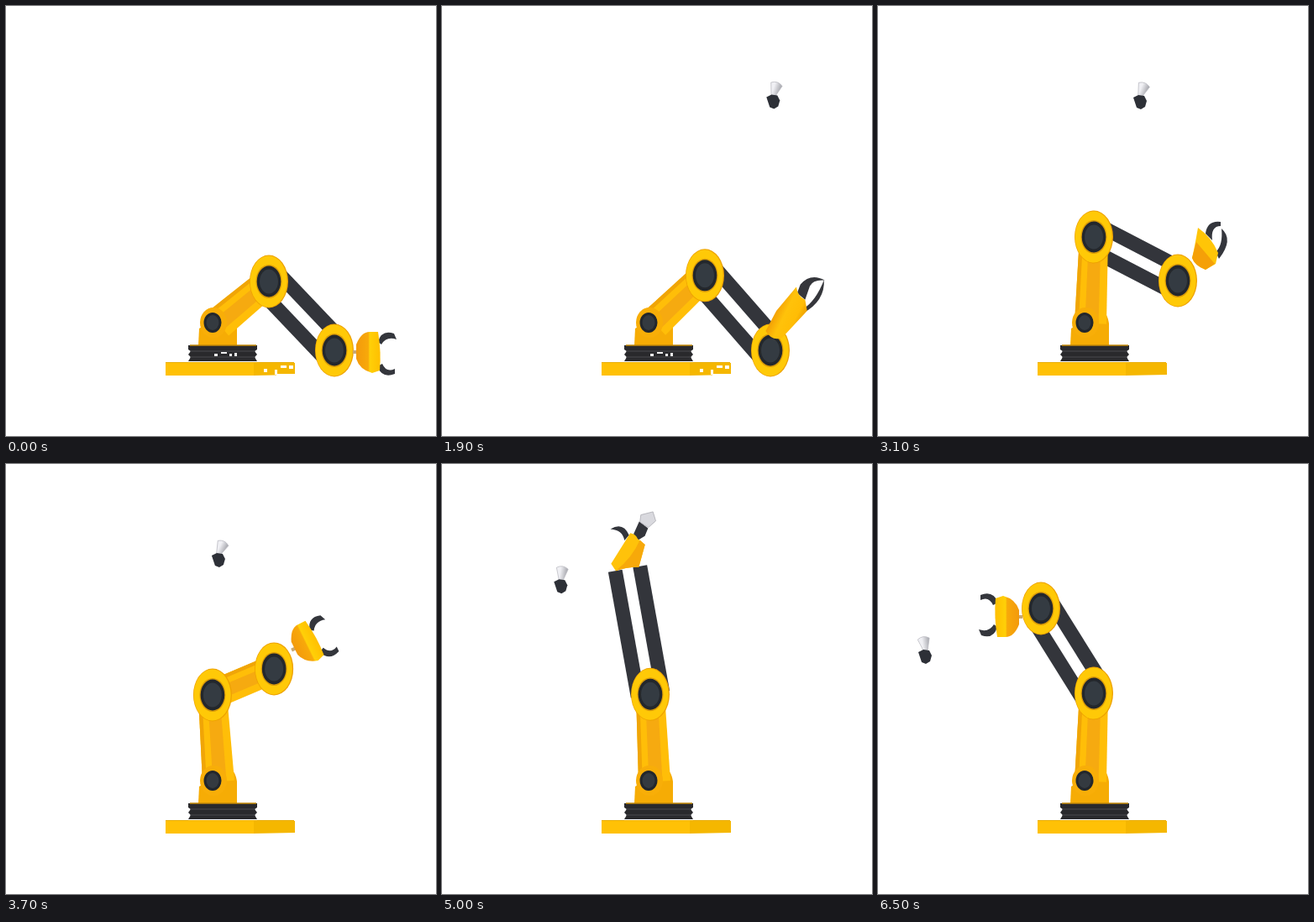
Write an HTML page that moves like this. It is 512x512 px and loops after 6600 ms.

```html
<!DOCTYPE html>
<html lang="en">
<head>
<meta charset="utf-8">
<title>Robot arm</title>
<style>
  html, body { margin: 0; width: 100%; height: 100%; overflow: hidden; background: #fff; }
  svg { display: block; width: 100%; height: 100%; }
</style>
</head>
<body>
<svg viewBox="0 0 512 512">
  <defs>
    <linearGradient id="gold">
      <stop offset="0" stop-color="#f3a005"/>
      <stop offset=".35" stop-color="#ffc20a"/>
      <stop offset=".75" stop-color="#ffbd05"/>
      <stop offset="1" stop-color="#eda000"/>
    </linearGradient>
    <linearGradient id="cup">
      <stop offset="0" stop-color="#f39a0c"/>
      <stop offset=".5" stop-color="#f8a90a"/>
      <stop offset=".56" stop-color="#ffd008"/>
      <stop offset="1" stop-color="#ffbf00"/>
    </linearGradient>
    <linearGradient id="wing">
      <stop offset=".35" stop-color="#f0f0f4"/>
      <stop offset="1" stop-color="#a3a4aa"/>
    </linearGradient>
    <g id="joint">
      <ellipse rx="23" ry="31.5" fill="#eda100"/>
      <ellipse cx="-.3" rx="22" ry="30.5" fill="#ffc907"/>
      <ellipse rx="15.5" ry="20" fill="#d99a08"/>
      <ellipse rx="14.3" ry="18.5" fill="#23272c"/>
      <ellipse rx="11" ry="14.5" fill="#343b42"/>
    </g>
    <g id="fly">
      <path id="wings" d="M-2 1L-7-13Q0-18 7-13L3 1Z" fill="url(#wing)" stroke="#b9b9c0" stroke-width=".7"/>
      <path d="M-8 3L-2 0L5 1L8 7L6 14L1 17L-4 15L-6 9Z" fill="#2d3037"/>
    </g>
  </defs>

  <g id="forearm">
    <line class="rod" stroke="#33353b" stroke-width="17"/>
    <line class="rod" stroke="#33353b" stroke-width="17"/>
  </g>
  <g id="solid"></g>

  <path d="M190 424H295V440H190Z" fill="#ffc106"/>
  <path d="M295 425H344V439L295 440Z" fill="#f5b700"/>
  <path d="M190 424.5H343" stroke="#e9ae08"/>
  <path id="worn" d="M307 432h4v4h-4zM320 433h3v6h-3zM327 428h7v3h-7zM337 428h5v4h-5zM322 438h22v3h-22z" fill="#fff"/>
  <path d="M217 404H299V409L296 411L299 415L296 418L299 423H217L220 418L217 415L220 411L217 409Z" fill="#29292c"/>
  <path d="M219 411H297M219 418H297" stroke="#4a4a4e"/>
  <path id="glints" d="M248 414h4v3h-4zM256 412h7v2h-7zM266 414h3v3h-3zM272 413h3v4h-3z" fill="#eee"/>
  <path d="M229 404L230 384L262 364Q272 360 275 378V404Z" fill="#f6ac05"/>
  <path d="M219 404H298" stroke="#c58a08" stroke-width="1.5"/>

  <g id="upper"></g>
  <ellipse cx="247" cy="377" rx="16" ry="18" fill="#f8ae08"/>
  <ellipse cx="246" cy="377" rx="10.5" ry="12" fill="#23272c"/>
  <ellipse cx="246" cy="377" rx="7.5" ry="9" fill="#343a40"/>
  <use id="elbow" href="#joint"/>
  <use id="wrist" href="#joint"/>

  <g id="side">
    <path d="M-18 0H-12" stroke="#c9a873" stroke-width="4"/>
    <path d="M12-12Q16-27 31-22L34-15Q22-19 16-9ZM11 17Q17 32 32 26L32 20Q22 25 17 14Z" fill="#34363c"/>
    <path d="M-14-9Q-8-24 2-24L12-24Q16 0 14 22L5 25Q-10 21-14 8Z" fill="url(#cup)"/>
  </g>
  <g id="up">
    <path d="M402 319L401 308Q406 290 425 291Q412 296 412 305L414 322ZM417 332Q426 318 424 291Q436 313 419 337Z" fill="#35363b"/>
    <path d="M398 313Q405 323 414 322L422 333L409 375Q400 384 388 376L389 349Z" fill="url(#gold)"/>
  </g>
  <g id="tilt">
    <path d="M390 271Q392 255 408 257L408 262Q396 262 398 279ZM402 293Q411 285 409 265Q424 278 406 301Z" fill="#34363c"/>
    <path d="M381 264Q397 275 405 294L402 307L390 314Q377 309 374 300Q377 287 381 264Z" fill="#ffc507"/>
    <path d="M379 281L401 307L390 314Q377 309 374 300Z" fill="#f5a008"/>
  </g>
  <g id="reach">
    <path d="M172 104Q164 94 151 100Q160 85 174 96ZM177 76L190 78L191 88L185 98L178 92Z" fill="#33353b"/>
    <path d="M175 68L186 58L194 66L190 77L178 76Z" fill="#d9d9de" stroke="#aaaab0" stroke-width=".7"/>
    <path d="M174 93Q181 91 185 95L196 97L202 124Q187 132 180 141L171 136Z" fill="#ffc20a"/>
    <path d="M188 95L196 97L202 124Q187 132 180 141Q190 117 188 95Z" fill="#f7a90a"/>
  </g>
  <use id="bug" href="#fly"/>
</svg>
<script>
const LOOP = 6600, STEP = 100;
const $ = id => document.getElementById(id);

// time, elbow x y, wrist x y, claw x y, claw angle
const ARM = [
  [1400, 313, 328, 391, 410, 431, 412, 0],
  [2100, 313, 318, 391, 410, 405, 347, -73],
  [2400, 313, 314, 391, 410, 403, 345, -78],
  [3100, 257, 275, 357, 327, 389, 288, -45],
  [4400, 233, 275, 275, 147, 318, 127, -4],
  [5200, 253, 274, 203, 117, 192, 103, -88],
  [5500, 257, 274, 197, 130, 186, 117, -95],
  [5600, 257, 274, 196, 158, 160, 140, -150],
  [6300, 257, 273, 194, 172, 154, 182, -180]
];
// time, x, y, wing angle
const FLY = [
  [1700, 408, 105, 15],
  [2400, 360, 107, 27],
  [3100, 312, 106, 22],
  [4400, 184, 106, 30],
  [4900, 149, 130, 12],
  [5500, 103, 173, -8],
  [5600, 91, 179, -8],
  [6300, 54, 219, -8],
  [6500, 56, 221, -8]
];
const CLAWS = {
  side: [0, 0, 0],
  up: [403, 345, -78],
  tilt: [389, 288, -45],
  reach: [186, 117, -95]
};

function sample(keys, t) {
  const i = keys.findIndex(k => k[0] > t);
  if (i === 0) return keys[0].slice(1);
  if (i < 0) return keys[keys.length - 1].slice(1);
  const a = keys[i - 1], b = keys[i], f = (t - a[0]) / (b[0] - a[0]);
  return a.slice(1).map((v, j) => v + (b[j + 1] - v) * f);
}

const show = (el, on) => el.setAttribute('display', on ? 'inline' : 'none');
const move = (el, x, y, turn = 0) =>
  el.setAttribute('transform', `translate(${x} ${y}) rotate(${turn})`);

function normal(ax, ay, bx, by) {
  const len = Math.hypot(bx - ax, by - ay);
  return [(by - ay) / len, (ax - bx) / len];
}

// Tapered limb with a lit strip along its middle.
function limb(ax, ay, wa, bx, by, wb) {
  const [nx, ny] = normal(ax, ay, bx, by);
  const strip = (from, to, color) => {
    const pt = (x, y, w) => `${x + nx * w},${y + ny * w}`;
    return `<polygon fill="${color}" points="${pt(ax, ay, wa * from)} ${pt(bx, by, wb * from)} ` +
      `${pt(bx, by, wb * to)} ${pt(ax, ay, wa * to)}"/>`;
  };
  return strip(-1, 1, '#ffbe08') + strip(-.5, .35, '#f6aa10') + strip(.75, 1, '#f0a507');
}

function clawAt(t) {
  if (t < 1800) return 'side';
  if (t < 2700) return 'up';
  if (t < 3700) return 'tilt';
  return t >= 5000 && t < 5600 ? 'reach' : 'side';
}

const rods = document.querySelectorAll('.rod');

function draw(t) {
  const [ex, ey, wx, wy, cx, cy, turn] = sample(ARM, t);
  const solid = t >= 3700 && t < 5000;
  const worn = t < 2800;

  $('upper').innerHTML = limb(253, 378, 19, ex, ey, 17);
  show($('forearm'), !solid);
  show($('solid'), solid);
  if (solid) $('solid').innerHTML = limb(ex, ey, 17, wx, wy, 17);

  const [nx, ny] = normal(ex, ey, wx, wy);
  rods.forEach((rod, i) => {
    const d = i ? -15 : 15;
    rod.setAttribute('x1', ex + nx * d);
    rod.setAttribute('y1', ey + ny * d);
    rod.setAttribute('x2', wx + nx * d);
    rod.setAttribute('y2', wy + ny * d);
  });

  move($('elbow'), ex, ey);
  move($('wrist'), wx, wy);
  const current = clawAt(t);
  show($('wrist'), current !== 'reach');
  for (const [name, [x, y, rest]] of Object.entries(CLAWS)) {
    const el = $(name);
    show(el, name === current);
    el.setAttribute('transform',
      `translate(${cx} ${cy}) rotate(${turn - rest}) translate(${-x} ${-y})`);
  }

  show($('worn'), worn);
  show($('glints'), worn);
  const [fx, fy, flap] = sample(FLY, t);
  show($('bug'), t >= FLY[0][0]);
  move($('bug'), fx, fy);
  $('wings').setAttribute('transform', `rotate(${flap})`);
}

const start = performance.now();
function tick() {
  const t = (performance.now() - start) % LOOP;
  draw(Math.floor(t / STEP) * STEP);
  requestAnimationFrame(tick);
}
draw(0);
requestAnimationFrame(tick);
</script>
</body>
</html>
```
